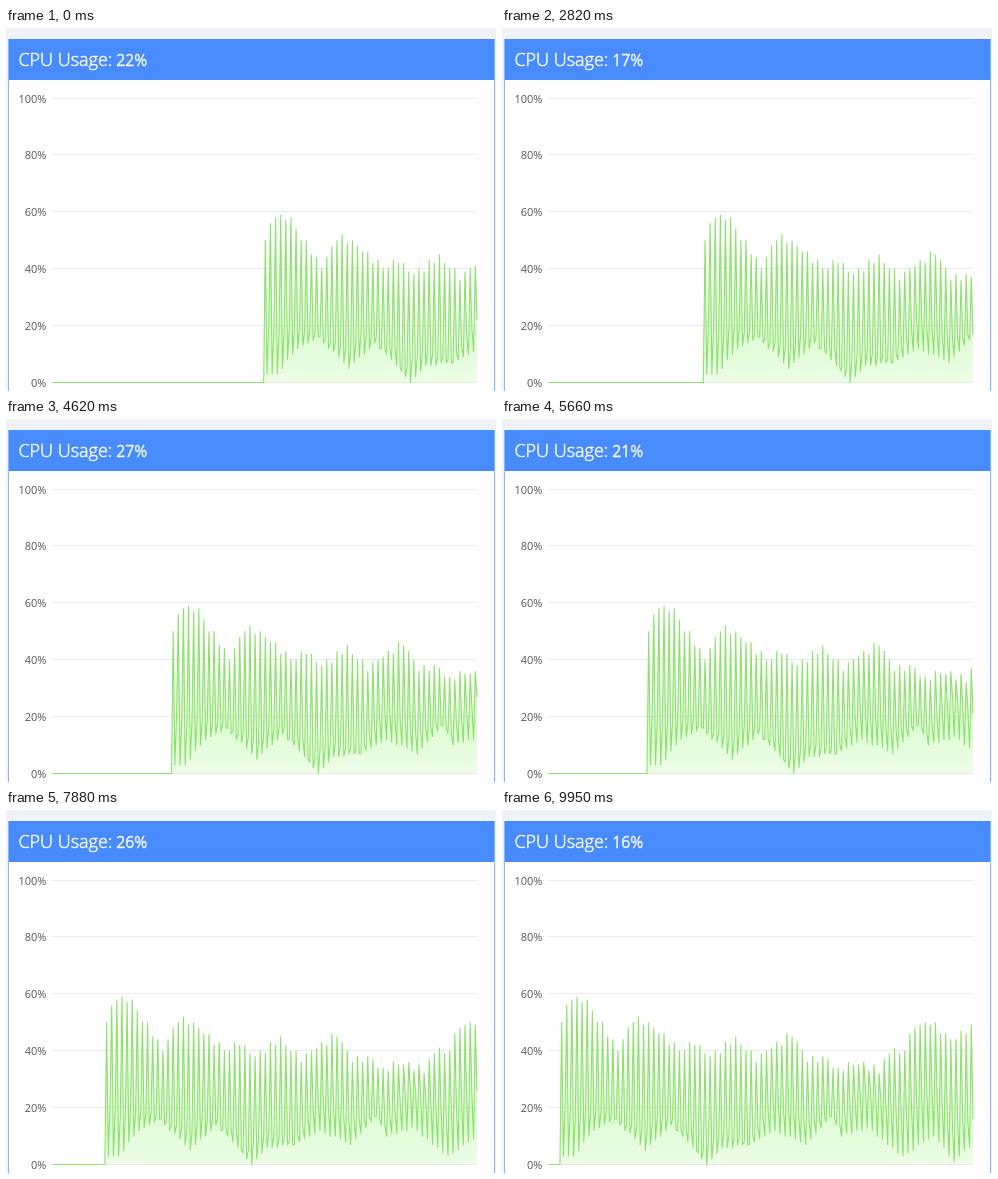
Recreate the animation shown at these times as an HTML page. Size 490 px wide and 363 px high, loop 9.98 s.

```html
<!DOCTYPE html>
<html lang="en">
<head>
<meta charset="utf-8">
<title>CPU usage</title>
<style>
  html, body { margin: 0; width: 100%; height: 100%; overflow: hidden; background: #eff2f7; }
  svg { display: block; font-family: "Open Sans", "Noto Sans", sans-serif; }
  .axis { font-size: 11px; fill: #545454; text-anchor: end; }
  .head { fill: #fff; stroke: #fff; }
  .title { font-size: 18px; font-weight: 300; stroke-width: .5px; }
  .value { font-size: 15.8px; stroke-width: .3px; }
</style>
</head>
<body>
<svg width="490" height="363" viewBox="0 0 490 363">
  <defs>
    <linearGradient id="fade" gradientUnits="userSpaceOnUse" x1="0" y1="186" x2="0" y2="354.5">
      <stop offset="0" stop-color="#7ee857" stop-opacity=".55"/>
      <stop offset="1" stop-color="#86f060" stop-opacity=".15"/>
    </linearGradient>
  </defs>
  <rect x="2.4" y="11" width="486.2" height="352" fill="#478bfd"/>
  <rect x="3" y="52" width="485" height="311" fill="#fff"/>
  <text class="head title" x="12.4" y="38">CPU Usage:</text>
  <text class="head value" id="value" x="110.3" y="38"></text>
  <g id="grid"></g>
  <path id="area" fill="url(#fade)"/>
  <path id="line" fill="none" stroke="#8ae26a" stroke-width="1.1" stroke-linejoin="round"/>
</svg>
<script>
const LOOP = 9980, STEPS = 39, COUNT = 250;
const LEFT = 46, WIDTH = 425, BASE = 354.5, UNIT = 2.84;

// Each cycle is a peak and two trough samples; key points are [cycle, percent].
const peak = curve([
  [0, 50], [2, 59], [5, 57], [11, 40], [14, 51], [17, 50], [23, 40], [26, 43], [29, 38],
  [34, 44], [38, 37], [45, 46], [48, 37], [52, 37], [54, 33], [57, 36], [62, 33],
  [65, 42], [66, 38], [69, 48], [72, 50], [76, 44], [80, 48]
]);
const trough = curve([
  [0, 3], [2, 3], [6, 12], [10, 16], [16, 5], [21, 14], [28, 0], [31, 6], [36, 7],
  [41, 12], [47, 7], [52, 17], [54, 10], [59, 13], [66, 3], [72, 10], [76, 1], [80, 8]
]);
// Second trough sample subtracted from the first.
const gap = curve([
  [0, -18], [10, 0], [18, -8], [25, 6], [28, -8], [36, 0], [41, 10],
  [47, 8], [52, 0], [59, 14], [66, 14], [72, 16], [80, 8]
]);

const $ = id => document.getElementById(id);

function curve(keys) {
  return x => {
    const n = Math.max(1, keys.findIndex(k => k[0] >= x));
    const [x0, y0] = keys[n - 1], [x1, y1] = keys[n];
    return Math.round(y0 + (y1 - y0) * (x - x0) / (x1 - x0));
  };
}

function sample(s) {
  if (s < 0) return 0;
  const i = Math.floor(s / 3), part = s % 3;
  if (part === 0) return peak(i) + Math.round(1.3 * Math.sin(2.6 * i));
  return trough(i) + Math.max(0, part === 1 ? gap(i) : -gap(i));
}

// Updates land on a coarse clock, so some gaps are half as long.
const stepTime = k => 148.4 * Math.round(1.72 * k);
const times = Array.from({ length: STEPS + 1 }, (_, k) => stepTime(k));

function draw(step) {
  const last = 3 * (41 + step) + 1;
  const points = Array.from({ length: COUNT }, (_, j) => {
    const x = LEFT + j * WIDTH / (COUNT - 1);
    const y = BASE - UNIT * sample(last - COUNT + 1 + j);
    return x.toFixed(2) + " " + y.toFixed(2);
  });
  const d = "M" + points.join("L");
  $("line").setAttribute("d", d);
  $("area").setAttribute("d", `${d}V${BASE}H${LEFT}Z`);
  $("value").textContent = sample(last) + "%";
}

for (let v = 0; v <= 100; v += 20) {
  const y = Math.floor(BASE - 0.5 - UNIT * v);
  $("grid").innerHTML +=
    `<rect x="${LEFT}" y="${y}" width="${WIDTH}" height="1" fill="#ebebeb"/>` +
    `<text class="axis" x="40.4" y="${y + 5}">${v}%</text>`;
}

let shown = -1;
const start = performance.now();
function tick() {
  const t = (performance.now() - start) % LOOP;
  const step = times.filter(at => at <= t).length - 1;
  if (step !== shown) draw(shown = step);
  requestAnimationFrame(tick);
}
tick();
</script>
</body>
</html>
```
